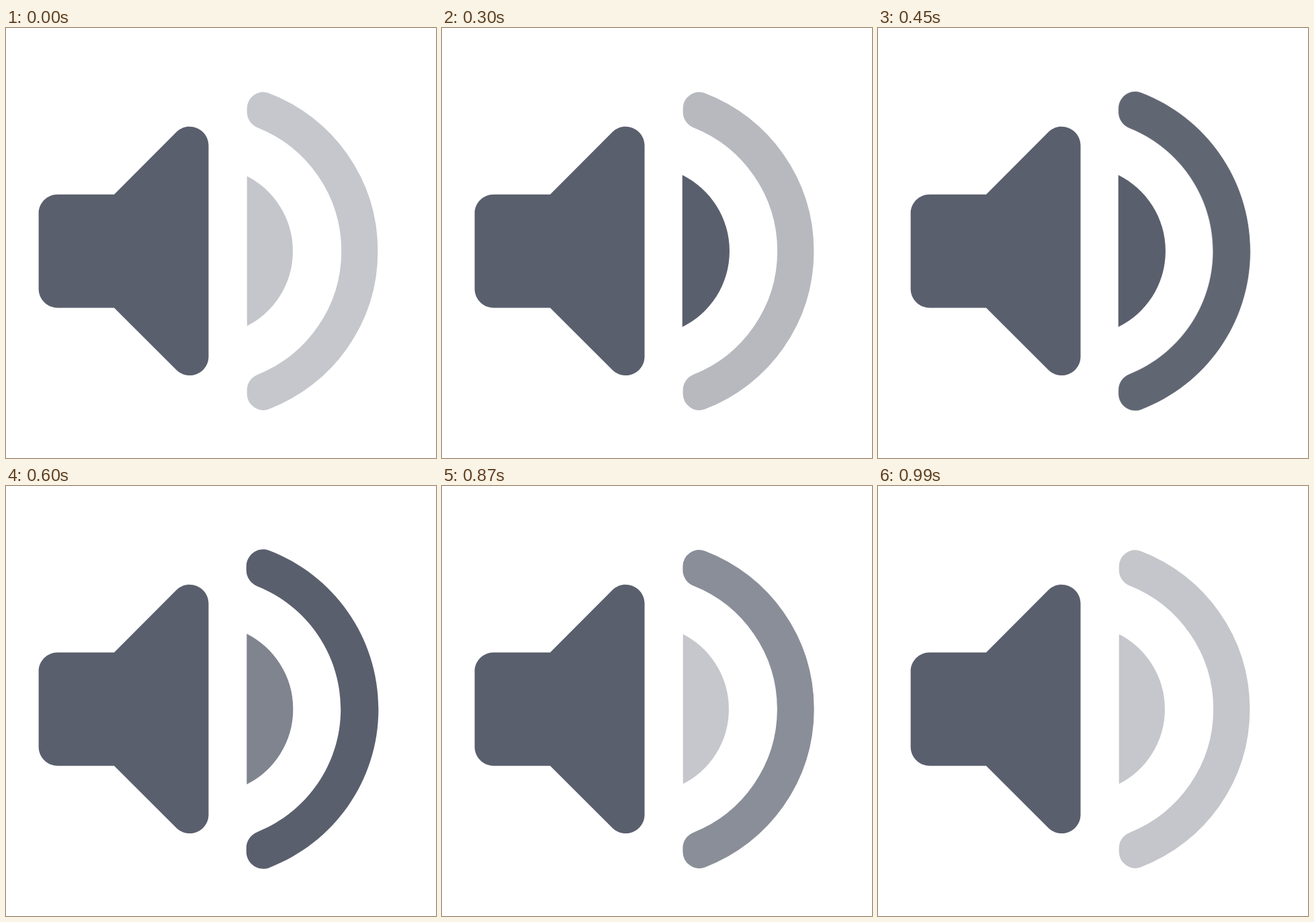
An HTML page with a canvas that plays this animation: 640 by 640 pixels, repeating every 1020 ms.

```html
<!DOCTYPE html>
<html lang="en">
<head>
<meta charset="utf-8">
<title>Speaker</title>
<style>
html, body { margin: 0; width: 100%; height: 100%; overflow: hidden; background: #fff; }
canvas { display: block; width: 100vmin; height: 100vmin; }
</style>
</head>
<body>
<canvas id="stage" width="640" height="640"></canvas>
<script>
const ctx = document.getElementById('stage').getContext('2d');

const LOOP = 1020, STEP = 30, QUARTER = LOOP / 4;
const INK = '#5a5f6d', PAPER = '#fff', DIM = 0.35;
const SCALE = 28.1, TRIM = 2;

// Icon shapes on a 24-unit grid
const body = new Path2D('M3 10v4c0 .55.45 1 1 1h3l3.29 3.29c.63.63 1.71.18 1.71-.71V6.41c0-.89-1.08-1.34-1.71-.71L7 9H4c-.55 0-1 .45-1 1z');
const dome = new Path2D('M16.5 12c0-1.77-1.02-3.29-2.5-4.03v8.05c1.48-.73 2.5-2.25 2.5-4.02z');
const arc = new Path2D('M14 4.45v.2c0 .38.25.71.6.85C17.18 6.53 19 9.06 19 12s-1.82 5.47-4.4 6.5c-.36.14-.6.47-.6.85v.2c0 .63.63 1.07 1.21.85C18.6 19.11 21 15.84 21 12s-2.4-7.11-5.79-8.4c-.58-.23-1.21.22-1.21.85z');

const ease = x => (1 - Math.cos(Math.PI * Math.min(1, Math.max(0, x)))) / 2;

// Fades in during one quarter of the loop and out two quarters later
function glow(t, start) {
  const x = (t - start) / QUARTER;
  return ease(x) - ease(x - 2);
}

// Waves get slightly slimmer as they fade
function wave(shape, level) {
  ctx.globalAlpha = DIM + (1 - DIM) * level;
  ctx.fill(shape);
  ctx.globalAlpha = 1;
  const trim = TRIM * Math.sqrt(1 - level);
  if (trim > 0) {
    ctx.lineWidth = trim / SCALE;
    ctx.stroke(shape);
  }
}

function draw(now) {
  const t = Math.floor((now % LOOP) / STEP) * STEP + STEP / 2;
  ctx.setTransform(1, 0, 0, 1, 0, 0);
  ctx.fillStyle = PAPER;
  ctx.fillRect(0, 0, 640, 640);

  ctx.setTransform(SCALE, 0, 0, SCALE, -35.7, -5.1);
  ctx.fillStyle = INK;
  ctx.strokeStyle = PAPER;
  ctx.fill(body);
  wave(dome, glow(t, 0));
  wave(arc, glow(t, QUARTER));
}

const begin = performance.now();
function tick() {
  draw(performance.now() - begin);
  requestAnimationFrame(tick);
}
tick();
</script>
</body>
</html>
```
